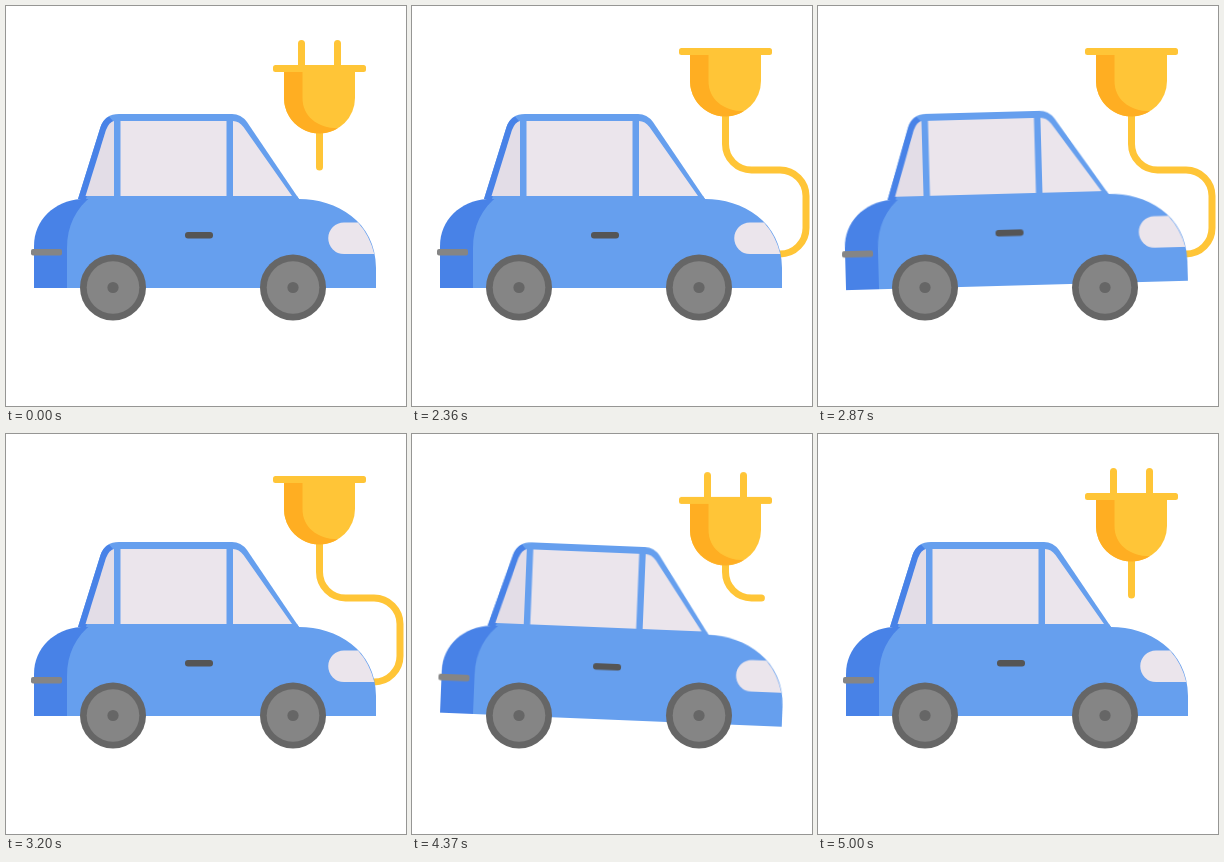
Recreate the animation shown at these times as an HTML page. Size 400 px wide and 400 px high, loop 5030 ms.

```html
<!DOCTYPE html>
<html lang="en">
<head>
<meta charset="utf-8">
<title>Electric car</title>
<style>
html, body { margin: 0; width: 100%; height: 100%; overflow: hidden; background: #fff; }
svg { display: block; width: 100%; height: 100%; }
:root { --light: #669fee; --dark: #4882e7; --glass: #ebe5ec; --yellow: #ffc537; --orange: #ffae22; }

.plug, .prongs, .cord, .car { animation: 5030ms ease-in-out infinite; }
.plug { animation-name: plug; }
.prongs { animation-name: prongs; }
.cord { animation-name: drop, draw; stroke-dasharray: 260; }
.car { animation-name: tilt; transform-origin: 107px 281px; }

/* rest, dip, rise to the socket, then spring back */
@keyframes plug {
  0%, 40.33% { transform: translateY(0); }
  40.36% { transform: translateY(7px); animation-timing-function: ease-out; }
  41.35% { transform: translateY(10px); }
  45.73%, 83.28% { transform: translateY(-17px); }
  83.3% { transform: translateY(-15px); }
  87.08% { transform: translateY(4px); }
  89.66% { transform: translateY(-3px); }
  92.45%, 100% { transform: translateY(0); }
}
@keyframes prongs {
  0%, 41.35% { transform: translateY(0); }
  45.73%, 83.28% { transform: translateY(28px); }
  83.3% { transform: translateY(22px); }
  87.08%, 100% { transform: translateY(0); }
}
@keyframes drop {
  0%, 40.36% { transform: translateY(25px); }
  42.74%, 47.12% { transform: translateY(0); }
  50.5%, 52% { transform: translateY(-1px); }
  57.65%, 87.08% { transform: translateY(0); }
  89.07%, 100% { transform: translateY(25px); }
}
@keyframes draw {
  0%, 40.33% { stroke-dashoffset: 194; }
  40.36% { stroke-dashoffset: 191.5; }
  47.51%, 83.28% { stroke-dashoffset: 0; }
  83.3% { stroke-dashoffset: 16; }
  89.07%, 100% { stroke-dashoffset: 194; }
}
@keyframes tilt {
  0%, 47.51% { transform: rotate(0deg); }
  50.7% { transform: rotate(2.4deg); }
  56.66% { transform: rotate(-1.7deg); }
  59.64% { transform: rotate(1.7deg); }
  62.62%, 83.3% { transform: rotate(0deg); }
  86.48% { transform: rotate(2.4deg); }
  92.45% { transform: rotate(-1.7deg); }
  95.43% { transform: rotate(1.7deg); }
  98.41%, 100% { transform: rotate(0deg); }
}
</style>
</head>
<body>
<svg viewBox="0 0 400 400">
  <defs>
    <g id="wheel">
      <circle r="33" fill="#666"/>
      <circle r="26.3" fill="#858585"/>
      <circle r="5.6" fill="#666"/>
    </g>
  </defs>

  <path class="cord" d="M313.5 70V138A26 26 0 0 0 339.5 164H368A26 26 0 0 1 394 190V222A26 26 0 0 1 368 248H362"
    fill="none" stroke="var(--yellow)" stroke-width="7" stroke-linecap="round"/>

  <g class="plug">
    <path class="prongs" d="M295.5 37.5V66M331.5 37.5V66" stroke="var(--yellow)" stroke-width="7" stroke-linecap="round"/>
    <path d="M278 62H349V92A35.5 35.5 0 0 1 278 92Z" fill="var(--yellow)"/>
    <path d="M278 62H296.500V92C296.500 110 311 122 332 122.300A35.500 35.500 0 0 1 278 92Z" fill="var(--orange)"/>
    <rect x="267" y="59" width="93" height="7" rx="2.5" fill="var(--yellow)"/>
  </g>

  <g class="car">
    <path d="M28 282V240C28 214 48 195 75 193H120V282Z" fill="var(--dark)"/>
    <path d="M72 193L94.500 121Q99 108 113 108H226Q235 108 241 116L293 193Z" fill="var(--light)"/>
    <path d="M72 193L94.500 121Q97 113.500 103 110.500L107 115L100 124L80 193Z" fill="var(--dark)"/>
    <path d="M61 282V242C61 220 70 202 86 190H291L293 193C330 193 370 215 370 262V282Z" fill="var(--light)"/>
    <path d="M79.500 190L100 124Q103 116 108 115V190Z" fill="#e3dde7"/>
    <path d="M114.500 115H220.500V190H114.500ZM227 115Q233 115 237.500 121L286 190H227Z" fill="var(--glass)"/>
    <path d="M338 216.500H352Q364 230 368.300 248H338A15.750 15.750 0 0 1 338 216.500Z" fill="var(--glass)"/>
    <rect x="179" y="226" width="28" height="6.500" rx="3" fill="#555"/>
    <rect x="25" y="243" width="31" height="6.500" rx="2" fill="#858585"/>
  </g>

  <use href="#wheel" x="107" y="281.500"/>
  <use href="#wheel" x="287" y="281.500"/>
</svg>
</body>
</html>
```
